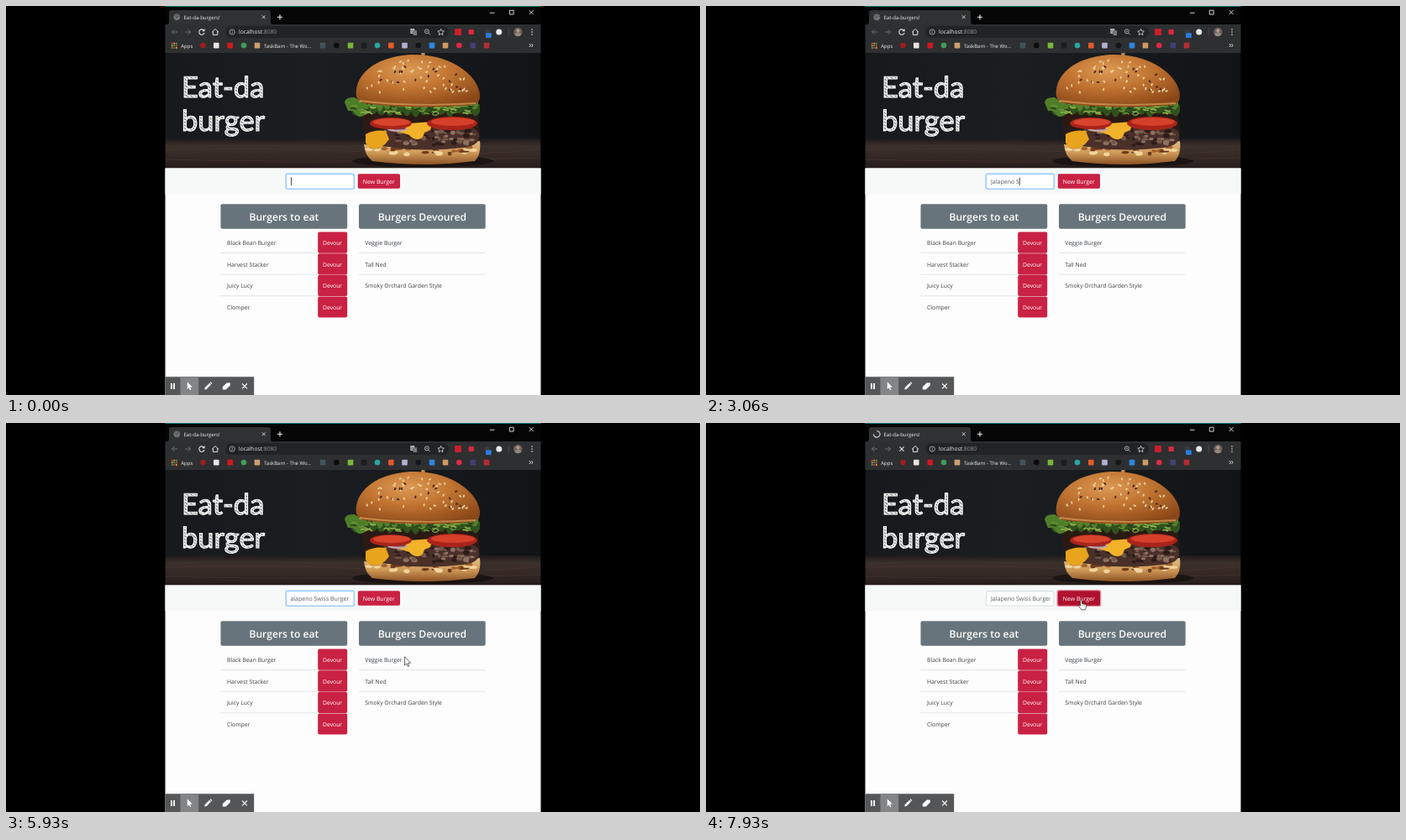
Recreate the animation shown at these times as an HTML page. Size 826x464 px, loop 8000 ms.

```html
<!DOCTYPE html>
<html lang="en">
<head>
<meta charset="utf-8">
<title>Eat-da-burgers!</title>
<style>
  html, body { margin: 0; width: 100%; height: 100%; overflow: hidden; background: #000; }
  svg { display: block; width: 826px; height: 464px; }
  text { font-family: "Open Sans", "Noto Sans", sans-serif; text-rendering: geometricPrecision; white-space: pre; }
  .hero { font-family: Lato, "Open Sans", sans-serif; font-weight: 400; }
</style>
</head>
<body>
<svg id="stage" viewBox="0 0 826 464" xmlns="http://www.w3.org/2000/svg"></svg>
<script>
const LOOP = 8000;
const PHRASE = 'Jalapeno Swiss Burger';
const KEYS = [600, 800, 1060, 2060, 2200, 2260, 2400, 2660, 2860, 3060, 3260,
  3460, 3530, 3800, 4200, 4530, 4600, 4730, 4930, 5130, 5200];
const BLINK = 530, PRESS = 7200, LOAD = 7270, TRANSLATE_OFF = 7800;
const RED = '#c92143', PRESSED = '#b0102f';

// Markup helpers
const rect = (x, y, w, h, fill, rx = 0, more = '') =>
  `<rect x="${x}" y="${y}" width="${w}" height="${h}" rx="${rx}" fill="${fill}" ${more}/>`;
const disc = (x, y, r, fill, more = '') => `<circle cx="${x}" cy="${y}" r="${r}" fill="${fill}" ${more}/>`;
const oval = (x, y, rx, ry, fill, more = '') =>
  `<ellipse cx="${x}" cy="${y}" rx="${rx}" ry="${ry}" fill="${fill}" ${more}/>`;
const shape = (d, fill, more = '') => `<path d="${d}" fill="${fill}" ${more}/>`;
const line = (d, color = '#e8e8e8', w = 1, more = '') =>
  `<path d="${d}" fill="none" stroke="${color}" stroke-width="${w}" ${more}/>`;
const text = (x, y, size, str, fill, more = '') =>
  `<text x="${x}" y="${y}" font-size="${size}" fill="${fill}" ${more}>${str}</text>`;
const cross = (x, y, r, color, w) => line(`M${x - r} ${y - r}l${2 * r} ${2 * r}m0 ${-2 * r}l${-2 * r} ${2 * r}`, color, w);

function random(seed) {
  return () => (seed = (seed * 16807) % 2147483647) / 2147483647;
}

const defs = `<defs>
  <linearGradient id="wall" x2="1" y2="0"><stop offset="0" stop-color="#17191c"/><stop offset=".4" stop-color="#1b1e21"/><stop offset="1" stop-color="#111316"/></linearGradient>
  <linearGradient id="wood" x2="0" y2="1"><stop offset="0" stop-color="#1b1a1b"/><stop offset=".25" stop-color="#3c302b"/><stop offset=".6" stop-color="#352925"/><stop offset="1" stop-color="#251c1a"/></linearGradient>
  <radialGradient id="bun" cx=".42" cy=".3" r=".75"><stop offset="0" stop-color="#dc9a55"/><stop offset=".45" stop-color="#c27532"/><stop offset="1" stop-color="#8a4718"/></radialGradient>
  <linearGradient id="base" x2="0" y2="1"><stop offset="0" stop-color="#e2bd82"/><stop offset=".5" stop-color="#cf9a58"/><stop offset="1" stop-color="#8d5326"/></linearGradient>
  <pattern id="hatch" width="3" height="3" patternUnits="userSpaceOnUse" patternTransform="rotate(35)"><rect width="3" height="3" fill="#e4e4e4"/><rect width="3" height=".9" fill="#55585a"/></pattern>
  <filter id="glow" x="-20%" y="-60%" width="140%" height="220%"><feGaussianBlur stdDeviation=".6"/></filter>
  <filter id="soft"><feGaussianBlur stdDeviation=".5"/></filter>
  <clipPath id="field"><rect x="338.5" y="201" width="71" height="16"/></clipPath>
  <clipPath id="banner"><rect x="189.5" y="56" width="447" height="137.5"/></clipPath>
</defs>`;

function chrome() {
  const dim = '#6d7074';
  let s = rect(189.5, 0, 447, 56, '#050505') + rect(189.5, 0, 447, 1, '#08706c');
  s += shape('M191 22q3 0 3-3v-11q0-3 3-3h115q3 0 3 3v11q0 3 3 3z', '#303133');
  s += rect(189.5, 22, 447, 34, '#2e2f31');
  s += `<g id="globe">${disc(203.3, 13.3, 3.8, '#75787b')}${line('M200.5 11.5l3 1.2-1 2.5m2-5l-.5 1.8 2.5 1', '#45484a', .9)}</g>`;
  s += line('', '#d5d8dc', 1.1, 'id="spinner"');
  s += text(211.5, 15.5, 6, 'Eat-da-burgers!', '#f0f0f0');
  s += cross(306.7, 13.2, 1.9, '#ddd', .9) + line('M323 13.2h6M326 10.2v6', '#f0f0f0', 1.1);
  s += line('M576 8.2h5.5M599.3 5.2h4.8v4.8h-4.8z', '#eee', .9) + cross(625.2, 7.6, 2.5, '#eee', .9);

  // Navigation row
  s += line('M204 31h-6.5m3-3l-3 3 3 3M213 31h6.5m-3-3l3 3-3 3', dim, 1);
  s += `<g id="reload">${line('M235.6 29.2a3.2 3.2 0 1 0 .5 2.6', '#e2e2e2', 1.1)}${shape('M236.6 27v3.2h-3.2z', '#e2e2e2')}</g>`;
  s += `<g id="stop">${cross(233, 31, 2.6, '#e2e2e2', 1.1)}</g>`;
  s += line('M245.2 31.2l3.9-3.7 3.9 3.7m-6.6-1v4.2h5.4v-4.2', '#e2e2e2', 1);
  s += rect(261, 24, 266, 14, '#222325', 7);
  s += disc(269.2, 31, 3.1, 'none', 'stroke="#b9bcc0" stroke-width=".8"') + line('M269.2 30.4v2.2M269.2 29v.8', '#c9ccd0', .8);
  s += text(277, 33.4, 6.7, 'localhost<tspan fill="#94979b">:8080</tspan>', '#f2f2f2');
  s += `<g id="translate">${rect(481.3, 27, 5, 6, '#b5b8bc', .6)}${rect(484.5, 29.2, 4.6, 5.8, '#77797d', .6)}` +
    text(482, 32, 4.6, 'G', '#333') + `</g>`;
  s += disc(500.9, 30.3, 2.5, 'none', 'stroke="#b5b8bc" stroke-width=".9"') + line('M502.8 32.2l2 2M499.8 30.3h2.2', '#b5b8bc', .9);
  s += line('M517.6 27.3l1.1 2.5 2.7.3-2 1.8.6 2.7-2.4-1.4-2.4 1.4.6-2.7-2-1.8 2.7-.3z', '#dcdcdc', .8);
  s += rect(534, 27, 8, 8, '#c81e2c', 1) + rect(550.5, 28, 6.4, 6, '#d8293a', 1);
  s += disc(572.5, 31, 3.2, '#3a3b3d') + rect(571, 32.3, 6.8, 5.6, '#2b7de0', 1);
  s += disc(586.8, 31, 3.5, '#e9eaec') + rect(597.8, 26.5, .7, 9, '#55575a');
  s += disc(609.3, 31, 5.2, '#6e625c') + disc(609.3, 29.2, 2, '#b59a8b') + shape('M605.2 34.2q4.1-6 8.2 0q-4.1 4-8.2 0z', '#93877f');
  [28, 31, 34].forEach(y => s += disc(626, y, .8, '#e2e2e2'));

  // Bookmark row
  const dots = ['#d9483b', '#e0a32e', '#43a45a'];
  for (let i = 0; i < 9; i++) s += rect(196.8 + i % 3 * 2.6, 43.8 + (i / 3 | 0) * 2.6, 1.8, 1.8, dots[(i + (i / 3 | 0)) % 3]);
  s += text(208.3, 49.5, 6, 'Apps', '#f0f0f0') + text(307, 49.5, 6, 'TaskBarn - The Wo...', '#f0f0f0');
  const marks = [[234.5, '#9c1d20'], [250.3, '#e8e4e3'], [266.8, '#d3181e'], [283, '#3f9c5b'], [299, '#c9a070'],
    [377, '#41545a'], [393.3, '#0c0c0d'], [410, '#77b63c'], [426, '#1d1d1f'], [442, '#2ba5a2'], [458.3, '#e2592b'],
    [474.5, '#b4aed0'], [490.8, '#151517'], [507, '#2f84dd'], [523, '#cd9a62'], [539.3, '#e02846'], [555.8, '#433f74'], [572, '#b42b35']];
  marks.forEach(([x, c], i) => s += i % 3 ? rect(x - 3.3, 43.8, 6.6, 6.6, c, .8) : disc(x, 47.1, 3.3, c));
  return s + line('M622.8 45l1.8 2-1.8 2m2.6-4l1.8 2-1.8 2', '#e6e6e6', .9);
}

// A ruffled band hanging below height y
function ruffle(x0, x1, y, h, n, fill, seed) {
  const rnd = random(seed), step = (x1 - x0) / n;
  let d = `M${x0} ${y}`;
  for (let i = 0; i < n; i++) d += `q${step / 2} ${-3 - 3 * rnd()} ${step} 0`;
  d += `v${h}`;
  for (let i = 0; i < n; i++) d += `q${-step / 2} ${4 + 10 * rnd()} ${-step} 0`;
  return shape(d + 'z', fill);
}

function burger() {
  const rnd = random(71);
  let s = oval(496, 185, 84, 7, '#120e0d', 'opacity=".7"');
  s += rect(494.3, 55, 4.2, 14, '#b98d53');
  s += shape('M422 112h138l4 40-6 20h-124l-8-18z', '#2b1a14');

  // Lower bun with melted spots
  s += shape('M426 165q68 9 138-4q2 16-6 24q-60 8-122 0q-9-7-10-20z', 'url(#base)');
  for (let i = 0; i < 30; i++) {
    s += oval(432 + 124 * rnd(), 168 + 9 * rnd(), 2 + 4 * rnd(), 1 + 1.6 * rnd(), ['#f0d49b', '#a3622d', '#6d3a1e'][i % 3]);
  }

  // Patty and cheese
  s += shape('M444 160q-1-11 10-14l100-1q11 3 9 13q-2 9-19 11q-46 5-82 0q-16-2-18-9z', '#4a3029');
  for (let i = 0; i < 60; i++) {
    s += oval(450 + 108 * rnd(), 149 + 18 * rnd(), 1.5 + 3 * rnd(), 1 + 1.6 * rnd(), ['#75594b', '#2c1b18', '#8f7262'][i % 3]);
  }
  s += shape('M428 153q10-6 24-4l4 10-5 6q-6 5-13 5t-10-7z', '#e8a41c');
  s += shape('M466 141l42-3-3 10-7 3q-2 8-8 8t-10-5l-15-5z', '#f2b32a');
  s += oval(466, 147, 12, 3, '#c6a5a6') + oval(467, 146, 9, 1.6, '#7d3855');

  // Tomato slices
  s += oval(458, 140, 25, 7, '#a9241a') + oval(531, 140, 30, 8, '#a9241a');
  s += oval(459, 138.6, 22, 4.6, '#d8432c') + oval(532, 138, 26, 5, '#d63f29');

  // Lettuce
  s += ruffle(411, 564, 118, 8, 15, '#30521d', 5) + ruffle(406, 562, 114, 5, 18, '#547f2b', 17);
  s += shape('M403 115q1-7 12-6l12 8 2 12q-7 5-11 2l-5-6-6 0z', '#4f7e2a');
  for (let i = 0; i < 70; i++) {
    s += line(`M${408 + 150 * rnd()} ${113 + 16 * rnd()}q3 ${-5 + 10 * rnd()} 7 1`, ['#93b34c', '#22391a', '#6c9736'][i % 3], 1.5);
  }

  // Upper bun and seeds
  s += shape('M417 108c-3-20 14-46 63-50c50-2 82 25 84 48c0 7-2 10-8 12q-66 6-130-2q-7-2-9-8z', 'url(#bun)');
  s += line('M421 113q60 8 138 3', '#d9a15d', 1.8, 'opacity=".7"');
  for (let i = 0; i < 64; i++) {
    const a = Math.PI * (1.03 + .94 * rnd()), r = .15 + .8 * Math.sqrt(rnd());
    const x = 489 + 66 * r * Math.cos(a), y = 106 + 45 * r * Math.sin(a), turn = 180 * rnd();
    s += oval(0, 0, 1.8, 1, i % 4 ? '#eccf9c' : '#452615', `transform="translate(${x.toFixed(1)} ${y.toFixed(1)}) rotate(${turn | 0})"`);
  }
  return `<g filter="url(#soft)">${s}</g>`;
}

function hero() {
  let s = rect(189.5, 56, 447, 138, 'url(#wall)') + rect(189.5, 158, 447, 36, 'url(#wood)');
  s += line('M189 172q120-4 240 2t208-3M189 183q190 5 448-2', '#4a3a33', .8, 'opacity=".7"');
  s += burger();
  const ink = 'class="hero" stroke="#fff" stroke-width="1.1"';
  s += text(209, 108.5, 34.5, 'Eat-da', 'url(#hatch)', ink) + text(209, 149, 34.5, 'burger', 'url(#hatch)', ink);
  return `<g clip-path="url(#banner)">${s}</g>`;
}

function page() {
  const mid = 'text-anchor="middle"';
  let s = rect(189.5, 193.5, 447, 270.5, '#fdfdfd') + rect(189.5, 193.5, 447, 31, '#f6f9f7');
  s += rect(332.3, 199.3, 83, 19.6, '#b4d7ff', 2.5, 'id="halo" filter="url(#glow)"');
  s += rect(333.5, 200.5, 80.5, 17.5, '#fff', 1.8, 'id="input" stroke-width=".8"');
  s += `<g clip-path="url(#field)">${text(339, 212, 7, '', '#555b61', 'id="typed"')}</g>`;
  s += rect(0, 204.3, .8, 9.6, '#222', 0, 'id="caret"');
  s += rect(417.5, 199, 52.8, 20, '#e58a9b', 2.5, 'id="ring"');
  s += rect(418.8, 200.3, 50.2, 17.4, RED, 1.8, 'id="button"');
  s += text(443.8, 212, 6.9, 'New Burger', '#fff', mid);

  [[255.5, 'Burgers to eat'], [420, 'Burgers Devoured']].forEach(([x, title]) => {
    s += rect(x, 236.3, 150.7, 29.5, '#68747b', 2);
    s += text(x + 75.3, 256.1, 12.1, title, '#fff', mid + ' font-weight="600"');
  });
  const row = 25.6;
  ['Black Bean Burger', 'Harvest Stacker', 'Juicy Lucy', 'Clomper'].forEach((name, i) => {
    const y = i * row;
    s += text(263, 285 + y, 6.85, name, '#3a3f44');
    if (i < 3) s += rect(255.5, 294.2 + y, 116, .8, '#dcdfe2');
    s += rect(371.2, 269.6 + y, 35, 25.2, RED, 2) + text(388.6, 285 + y, 6.8, 'Devour', '#fff', mid);
  });
  ['Veggie Burger', 'Tall Ned', 'Smoky Orchard Garden Style'].forEach((name, i) => {
    const y = i * row;
    s += text(427.3, 285 + y, 6.85, name, '#3a3f44');
    if (i < 2) s += rect(420, 294.2 + y, 150.5, .8, '#dcdfe2');
  });
  return s;
}

function recorder() {
  let s = rect(189.5, 442.3, 105.7, 21.7, '#555657') + rect(207.5, 442.3, 21.7, 21.7, '#838485');
  s += rect(196, 450, 1.8, 7, '#fff') + rect(199.2, 450, 1.8, 7, '#fff');
  s += shape('M215.8 448.5v8.6l2-1.8 1.3 3 1.3-.6-1.3-2.9 2.7-.2z', '#fff');
  s += shape('M236.2 457.6l.7-2.6 5.3-5.3 1.9 1.9-5.3 5.3zM242.7 449.2l.9-.9 1.9 1.9-.9.9z', '#fff');
  s += shape('M257.8 454.2l5-4.6h4v3l-5 4.9h-4z', '#fff');
  return s + cross(284, 453.4, 2.9, '#fff', 1.1);
}

const pointers =
  `<g id="arrow">${shape('M0 0v10.2l2.4-2.1 1.5 3.5 1.5-.7-1.5-3.4 3.2-.2z', '#fff', 'stroke="#222" stroke-width=".7"')}</g>` +
  `<g id="hand">${shape('M-1 1q0-1 1-1t1 1v3.4l4 .9q1 .3 1 1.4l-.7 3.6-.7 1.5h-4.4l-3-4.1q-.5-1.4.9-1.3l.9.8z', '#fff', 'stroke="#222" stroke-width=".7"')}` +
  line('M2 5.2v2M3.7 5.6v1.8', '#444', .5) + `</g>`;

const stage = document.getElementById('stage');
stage.innerHTML = defs + chrome() + hero() + page() + recorder() + pointers;
const ui = {};
stage.querySelectorAll('[id]').forEach(el => ui[el.id] = el);

const set = (el, name, value) => el.setAttribute(name, value);
const show = (el, on) => set(el, 'visibility', on ? 'visible' : 'hidden');
const clamp = v => Math.max(0, Math.min(1, v));
const mix = (a, b, k) => a + (b - a) * k;
const blend = (a, b, k) => `rgb(${a.map((v, i) => Math.round(mix(v, b[i], k)))})`;

// Pointer path: time, x, y
const PATH = [[5660, 500, 345], [6000, 468, 262], [6330, 446, 219], [6530, 444.6, 214.5], [6950, 446.6, 211]];

function pointerAt(t) {
  let i = 0;
  while (i < PATH.length - 2 && t > PATH[i + 1][0]) i++;
  const [a, b] = [PATH[i], PATH[i + 1]], k = clamp((t - a[0]) / (b[0] - a[0]));
  return [mix(a[1], b[1], k), mix(a[2], b[2], k)];
}

function drawField(t) {
  const count = KEYS.filter(k => k <= t).length;
  const focus = t < PRESS, fade = clamp((t - PRESS) / 150);
  ui.typed.textContent = PHRASE.slice(0, count);
  const width = count ? ui.typed.getComputedTextLength() : 0;
  const shift = focus ? Math.max(0, width - 69.3) : 0;
  set(ui.typed, 'x', 339 - shift);
  set(ui.caret, 'x', 339 + width - shift);
  const lastKey = count ? KEYS[count - 1] : 60 - BLINK;
  show(ui.caret, focus && Math.floor((t - lastKey) / BLINK) % 2 === 0);
  set(ui.input, 'stroke', blend([128, 189, 255], [206, 212, 218], fade));
  set(ui.halo, 'opacity', 1 - fade);
  set(ui.ring, 'opacity', fade);
  set(ui.button, 'fill', focus ? RED : PRESSED);
}

function drawLoading(t) {
  const on = t >= LOAD;
  show(ui.globe, !on);
  show(ui.reload, !on);
  show(ui.stop, on);
  show(ui.spinner, on);
  show(ui.translate, t < TRANSLATE_OFF);
  if (!on) return;
  const k = (t - 7330) / 600, head = 180 - 270 * k, sweep = 90 + 180 * k;
  const at = deg => {
    const a = deg * Math.PI / 180;
    return `${203.3 + 3.8 * Math.cos(a)} ${13.3 + 3.8 * Math.sin(a)}`;
  };
  set(ui.spinner, 'd', `M${at(head)}A3.8 3.8 0 ${sweep > 180 ? 1 : 0} 1 ${at(head + sweep)}`);
}

function drawPointer(t) {
  const [x, y] = pointerAt(t), over = x > 419 && x < 469 && y > 200 && y < 218;
  const moved = t >= PATH[0][0];
  show(ui.arrow, moved && !over);
  show(ui.hand, moved && over);
  [ui.arrow, ui.hand].forEach(el => set(el, 'transform', `translate(${x} ${y})`));
}

function frame() {
  const t = performance.now() % LOOP;
  drawField(t);
  drawLoading(t);
  drawPointer(t);
  requestAnimationFrame(frame);
}
frame();
</script>
</body>
</html>
```
